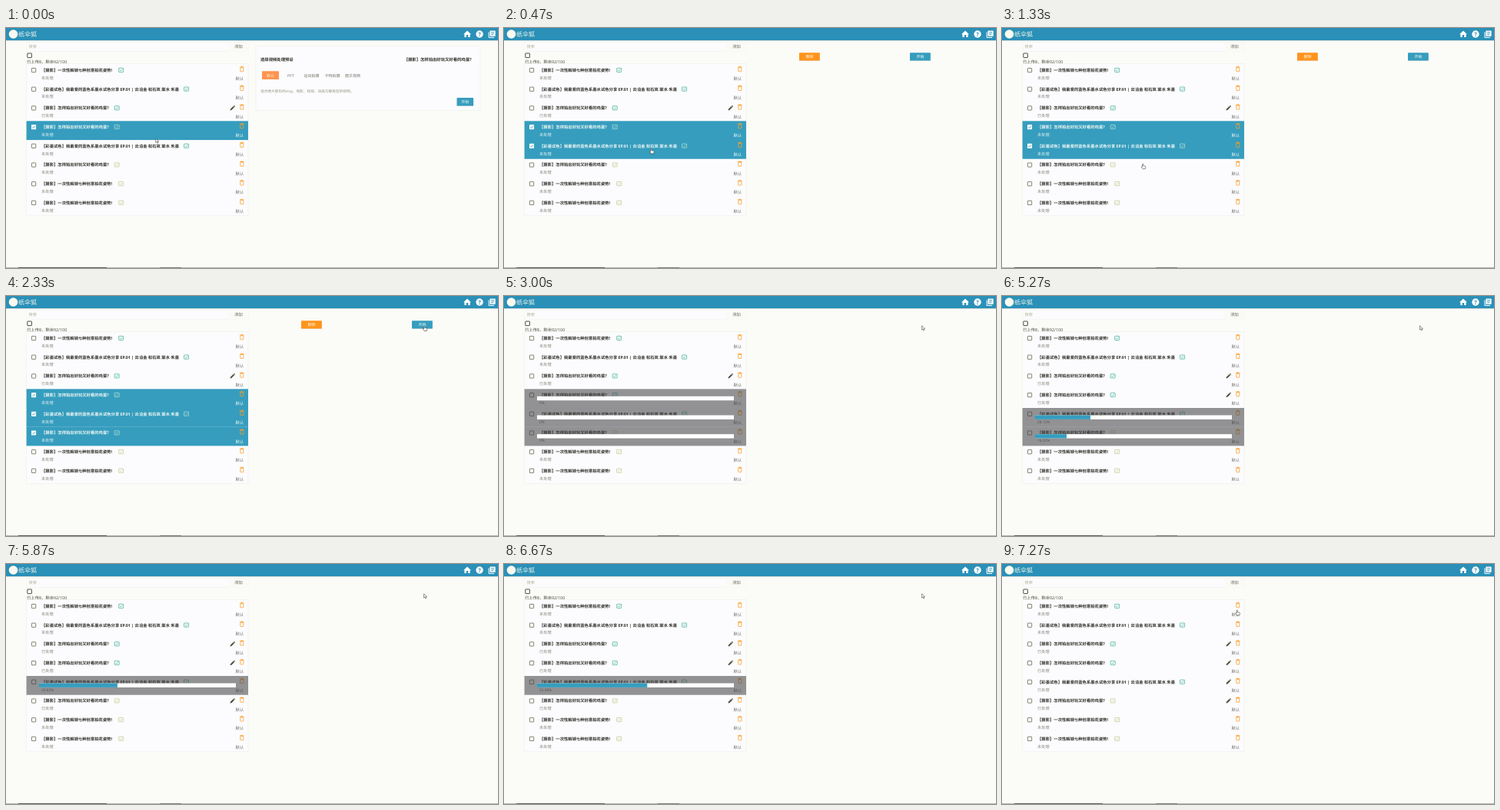
An HTML page that plays this animation: 640 px wide and 313 px high, repeating every 7340 ms.

```html
<!DOCTYPE html>
<html lang="zh">
<head>
<meta charset="utf-8">
<title>视频处理列表</title>
<style>
html, body { margin: 0; width: 100%; height: 100%; overflow: hidden; background: #fbfbf8; }
svg { display: block; width: 100vw; height: 100vh; }
text {
  font-family: "Open Sans", "Noto Sans CJK SC", "Noto Sans CJK", sans-serif;
  text-rendering: geometricPrecision;
  text-spacing-trim: space-all;
  white-space: pre;
}
</style>
</head>
<body>
<svg id="stage" viewBox="0 0 640 313" preserveAspectRatio="none"></svg>
<script>
const LOOP = 7340;
const HEADER = '#2a90b8', ACCENT = '#369dbe', ORANGE = '#fb9c28';
const INK = '#2c2c26', SOFT = '#72726a', MUTED = '#88887c', PAPER = '#fcfcfe', EDGE = '#ececе4'.replace('е', 'e');
const TOP = 47.2, ROW_H = 24.7, BAR_X = 43, BAR_W = 256;
const stage = document.getElementById('stage');

function add(parent, tag, attrs = {}, content) {
  const node = document.createElementNS('http://www.w3.org/2000/svg', tag);
  for (const key in attrs) node.setAttribute(key, attrs[key]);
  if (content !== undefined) node.textContent = content;
  parent.appendChild(node);
  return node;
}
const group = (parent, x = 0, y = 0) => add(parent, 'g', { transform: `translate(${x} ${y})` });
const rect = (parent, x, y, width, height, fill, more) =>
  add(parent, 'rect', { x, y, width, height, fill, ...more });
const label = (parent, x, y, size, fill, content, more) =>
  add(parent, 'text', { x, y, 'font-size': size, fill, ...more }, content);
const line = (parent, d, stroke, width = 0.8) =>
  add(parent, 'path', { d, fill: 'none', stroke, 'stroke-width': width });
const show = (node, on) => node.setAttribute('display', on ? 'inline' : 'none');
const BOLD = { 'font-weight': 700 };
const END = { 'text-anchor': 'end' };
const MID = { 'text-anchor': 'middle' };

function button(parent, x, y, w, h, fill, content) {
  rect(parent, x, y + 0.5, w, h, '#000', { opacity: 0.12, rx: 0.7 });
  rect(parent, x, y, w, h, fill, { rx: 0.7 });
  label(parent, x + w / 2, y + h / 2 + 1.8, 5, '#fffff4', content, MID);
}

function drawHeader() {
  rect(stage, 0, 0, 640, 313, '#fbfbf8');
  rect(stage, 0, 16, 640, 0.8, '#c9d4d2');
  rect(stage, 0, 0, 640, 16, HEADER);
  add(stage, 'circle', { cx: 9.5, cy: 8, r: 5.8, fill: '#fafaf0' });
  label(stage, 16, 11, 8, '#f4f8ec', '纸伞狐');
  add(stage, 'path', { d: 'M600 3.6L605 8.2H603.6V12H601.2V9H598.8V12H596.4V8.2H595Z', fill: '#fff' });
  add(stage, 'circle', { cx: 616, cy: 8, r: 4.7, fill: '#fff' });
  label(stage, 616, 10.7, 7.4, HEADER, '?', { ...BOLD, ...MID });
  line(stage, 'M628 5.4V12.4H635', '#fff', 1);
  rect(stage, 629.4, 3.4, 7.2, 7.4, '#fff', { rx: 0.5 });
  line(stage, 'M631 5.4H635M631 7.1H635M631 8.8H634', HEADER, 0.7);
  rect(stage, 0, 312, 640, 1, '#b4b8b0');
  rect(stage, 16, 312, 115, 1, '#5c5e5a');
  rect(stage, 200, 312, 28, 1, '#7c7e78');
}

function drawTools() {
  rect(stage, 27, 18.8, 288, 12, PAPER, { stroke: EDGE, 'stroke-width': 0.4 });
  label(stage, 29.5, 26.4, 5.2, '#b4b498', '搜索');
  rect(stage, 289, 18.8, 26, 12, '#fafaf6');
  label(stage, 302.5, 26.1, 5.33, '#66665a', '添加', MID);
  rect(stage, 27.8, 33, 5.6, 5.6, 'none', { stroke: '#3a3a30', 'stroke-width': 0.9, rx: 0.5 });
  label(stage, 27, 45.8, 5.33, '#45453a', '已上传8，剩余92/100');
  rect(stage, 26.8, TOP - 0.7, 288.2, ROW_H * 8 + 0.7, PAPER, { stroke: EDGE, 'stroke-width': 0.5 });
}

const FLOWER = ['【摄影】一次性解锁七种创意拍花姿势!', 146.3];
const INKS = ['【彩墨试色】我最爱的蓝色系墨水试色分享 EP.01 | 云泊金 松石岚 棠水 禾墨', 231.2];
const EGGS = ['【摄影】怎样拍出好玩又好看的鸡蛋?', 140.8];

function makeRow([title, iconX], i) {
  const g = group(stage, 0, TOP + ROW_H * i);
  const back = rect(g, 26.6, 0, 288.4, ROW_H + 0.05, ACCENT);
  const box = rect(g, 33.4, 5.2, 5.3, 5.3, 'none', { stroke: '#66664c', 'stroke-width': 0.8, rx: 0.5 });
  const tick = group(g);
  rect(tick, 33, 4.8, 6.1, 6.1, '#fff', { rx: 0.6 });
  line(tick, 'M34.3 7.9L35.6 9.2L38 6.4', ACCENT, 0.9);
  const name = label(g, 46, 9.7, 5.33, INK, title, BOLD);
  const tint = i < 5 ? '#46b098' : '#c6c890';
  const icon = group(g);
  rect(icon, iconX + 0.4, 5.1, 6, 5.2, 'none', { 'stroke-width': 0.75, rx: 0.4 });
  add(icon, 'path', { d: `M${iconX + 1.7} 7.6l1.2 1.2l2.4 -2.3`, fill: 'none', 'stroke-width': 0.75 });
  const status = label(g, 46, 19.6, 5.2, MUTED, '');
  const preset = label(g, 309.2, 21, 5.33, SOFT, '默认', END);
  rect(g, 304.8, 4.5, 4, 5.1, 'none', { stroke: ORANGE, 'stroke-width': 0.8, rx: 0.5 });
  line(g, 'M303.9 3.8H309.7M305.8 3.1H307.8', ORANGE, 0.8);
  const pencil = add(g, 'path', { d: 'M291.6 10.8L291.9 9.1L295.7 5.3L297.1 6.7L293.3 10.5ZM296.1 4.9L296.8 4.2L298.2 5.6L297.5 6.3Z', fill: '#4c4c38' });
  const busy = group(g);
  rect(busy, 26.6, 0, 288.4, ROW_H + 0.05, '#404042', { opacity: 0.56 });
  rect(busy, BAR_X, 9.5, BAR_W, 5.4, '#fff');
  const bar = rect(busy, BAR_X, 9.5, 0, 5.4, ACCENT);
  const percent = label(busy, 46, 19.6, 4.8, '#54544c', '');
  return { back, box, tick, name, tint, icon, status, preset, pencil, busy, bar, percent };
}

function makePresetPanel() {
  const g = group(stage);
  rect(g, 325, 23.3, 292, 84, PAPER, { stroke: EDGE, 'stroke-width': 0.5 });
  label(g, 331, 43, 5.33, INK, '选择视频处理预设', BOLD);
  label(g, 605.5, 43, 5.33, INK, EGGS[0], { ...BOLD, ...END });
  rect(g, 333, 56.3, 22, 10.8, '#ff9450', { rx: 0.6 });
  [['默认', 344, '#fff4d8'], ['PPT', 370.5], ['运动拍摄', 397.5], ['卡特拍摄', 424.5], ['图文视频', 451]]
    .forEach(([name, x, fill]) => label(g, x, 63.8, 5, fill || SOFT, name, MID));
  label(g, 331, 83.8, 4.7, '#949480', '适合绝大部份的vlog、电影、短视、动画与静类型的视频。');
  button(g, 586.5, 91, 21.5, 10.6, ACCENT, '开始');
  return g;
}

function makeBatchPanel() {
  const g = group(stage);
  button(g, 384, 32.2, 26.8, 10.4, '#ff941c', '删除');
  button(g, 528, 32.2, 26.8, 10.4, ACCENT, '开始');
  return g;
}

function makePointer(d) {
  return add(stage, 'path', { d, fill: '#fff', stroke: '#33332c', 'stroke-width': 0.55, 'stroke-linejoin': 'round' });
}

// Points are [time, value, value...]; values hold outside the range.
function track(points, t, ease = k => k) {
  if (t <= points[0][0]) return points[0].slice(1);
  for (let i = 1; i < points.length; i++) {
    const a = points[i - 1], b = points[i];
    if (t < b[0]) {
      const k = ease((t - a[0]) / (b[0] - a[0]));
      return a.slice(1).map((v, j) => v + (b[j + 1] - v) * k);
    }
  }
  return points[points.length - 1].slice(1);
}
const smooth = k => k * k * (3 - 2 * k);

drawHeader();
drawTools();
const rows = [FLOWER, INKS, EGGS, EGGS, INKS, EGGS, FLOWER, FLOWER].map(makeRow);
const presetPanel = makePresetPanel();
const batchPanel = makeBatchPanel();
const arrow = makePointer('M0 0V5.4L1.3 4.3L2.2 6.2L3.1 5.8L2.2 3.9H3.9Z');
const hand = makePointer('M0 0.5Q0.6 -0.3 1.2 0.5V2.7L3.9 3.3Q4.4 3.5 4.3 4.3L3.8 6.8H0.4L-1.4 4.1Q-1.2 3.2 0 4Z');

const START = 2530;
const jobs = {
  3: { pick: 0, done: 4930, steps: [[3800, 0], [4330, 13.7], [4930, 27]] },
  4: { pick: 400, done: 6870, steps: [[3800, 0], [4330, 12.1], [5270, 28.1], [5870, 39.8], [6870, 60]] },
  5: { pick: 1500, done: 5670, steps: [[4400, 0], [5270, 16], [5670, 24]] }
};
const path = [[70, 194.8, 144], [330, 192, 156], [600, 190, 158], [1070, 182.6, 177], [1600, 182.6, 177],
  [2200, 543.6, 38.8], [7000, 543.6, 38.8], [7260, 305.2, 60]];

function drawRow(row, i, t) {
  const job = jobs[i];
  const picked = !!job && t >= job.pick && t < START;
  const busy = !!job && t >= START && t < job.done;
  const done = i === 2 || (!!job && t >= job.done);
  show(row.back, picked);
  show(row.tick, picked);
  show(row.box, !picked);
  show(row.pencil, done);
  show(row.busy, busy);
  show(row.status, !busy);
  row.name.setAttribute('fill', picked ? '#f2f8f4' : INK);
  row.icon.setAttribute('stroke', picked ? '#b4e0d0' : row.tint);
  row.status.setAttribute('fill', picked ? '#e6f3f0' : MUTED);
  row.preset.setAttribute('fill', picked ? '#f2f8f4' : SOFT);
  row.status.textContent = done ? '已处理' : '未处理';
  if (busy) {
    const [p] = track(job.steps, t);
    row.bar.setAttribute('width', BAR_W * p / 100);
    row.percent.textContent = p ? p.toFixed(2) + '%' : '0%';
  }
}

function draw(t) {
  rows.forEach((row, i) => drawRow(row, i, t));
  show(presetPanel, t < jobs[4].pick);
  show(batchPanel, t >= jobs[4].pick && t < START);
  const [x, y] = track(path, t, smooth);
  const overList = t > 70 && x < 315 && y > TOP;
  const overStart = t < START && x > 528 && x < 555 && y < 43;
  const pointing = overList || overStart;
  show(hand, pointing);
  show(arrow, !pointing);
  (pointing ? hand : arrow).setAttribute('transform', `translate(${x} ${y})`);
}

const begin = performance.now();
function tick(now) {
  draw(Math.max(0, now - begin) % LOOP);
  requestAnimationFrame(tick);
}
draw(0);
requestAnimationFrame(tick);
</script>
</body>
</html>
```
